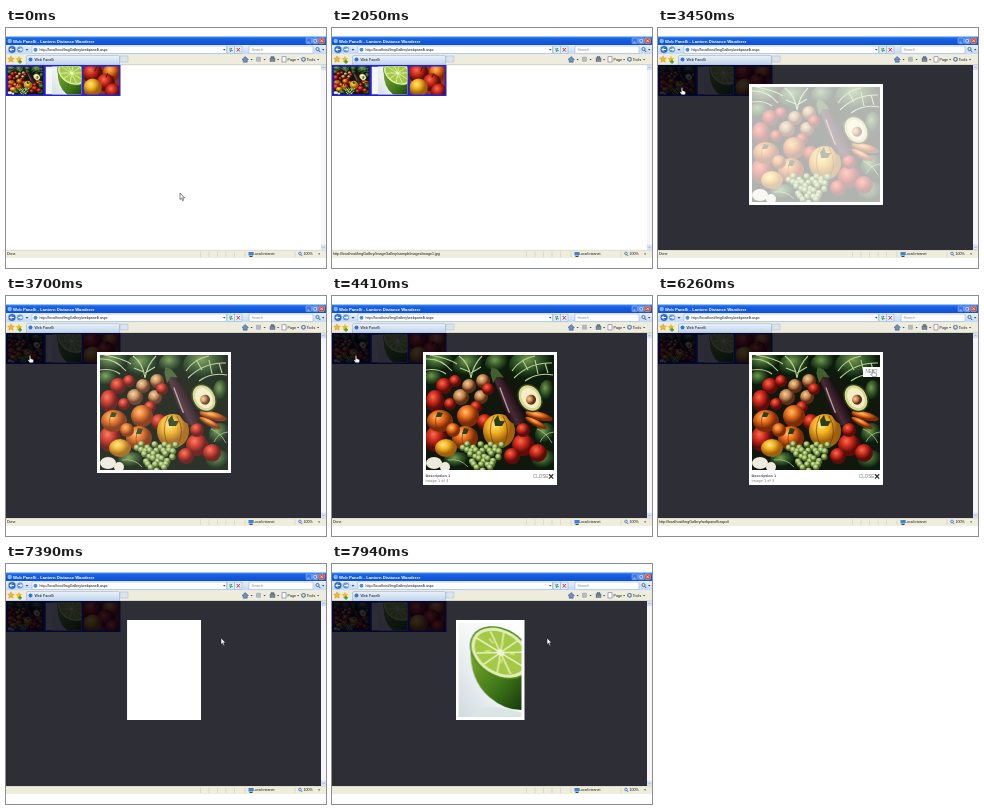
Animation, 320 px wide and 240 px high, one loop 8000 ms. Source, as an HTML page:

```html
<!DOCTYPE html>
<html lang="en">
<head>
<meta charset="utf-8">
<title>Web Panelli</title>
<style>
html, body { margin: 0; width: 100%; height: 100%; overflow: hidden; background: #fff; }
#stage { position: relative; width: 320px; height: 240px; overflow: hidden; background: #fff; }
#stage > *, #box > *, #pointer > * { position: absolute; }
svg { display: block; }
text { font-family: "Liberation Sans", Arial, sans-serif; font-size: 3.6px; fill: #111; }
#chrome, #defs { left: 0; top: 0; }

#veil { left: 0; top: 37px; width: 315px; height: 185px; background: rgba(0, 0, 12, .82); }
#box { left: 158px; top: 56px; transform: translateX(-50%); background: #fff; overflow: hidden; }
#photo1, #photo2 { left: 3px; top: 3px; }
#caption { left: 91px; top: 177px; width: 134px; overflow: hidden; background: #fff; }
#next { left: 205px; top: 71px; }
#arrow, #hand { left: 0; top: 0; }

#veil, #box, #photo1, #photo2, #caption, #arrow, #hand, #pointer, #next, .status {
  animation: 8s linear infinite;
}
#veil { animation-name: veil; }
#box { animation-name: size, boxOn; animation-duration: 8s, 8s; animation-timing-function: ease-in-out, step-end; }
#photo1 { animation-name: photo1; }
#photo2 { animation-name: photo2; }
#caption { animation-name: caption; }
#pointer { left: 0; top: 0; animation-name: move; animation-timing-function: ease-in-out; }
#arrow { animation-name: arrow; animation-timing-function: step-end; }
#hand { animation-name: hand; animation-timing-function: step-end; }
#next { animation-name: next; animation-timing-function: step-end; }
.status { animation-timing-function: step-end; }
#done { animation-name: done; }
#link1 { animation-name: link1; }
#link2 { animation-name: link2; }

@keyframes veil { 0%, 33.6% { opacity: 0; } 36.625%, 100% { opacity: 1; } }
@keyframes boxOn { 0% { opacity: 0; } 36.625%, 100% { opacity: 1; } }
@keyframes size {
  0%, 36.625% { width: 78px; height: 78px; }
  38.75% { width: 78px; height: 121px; }
  41.25%, 83.5% { width: 134px; height: 121px; }
  87.625% { width: 134px; height: 100px; animation-timing-function: step-end; }
  88.375% { width: 121px; height: 100px; animation-timing-function: step-end; }
  90.875% { width: 104px; height: 100px; animation-timing-function: linear; }
  91.625% { width: 86px; height: 100px; animation-timing-function: linear; }
  92.375% { width: 74px; height: 100px; animation-timing-function: ease-out; }
  93.25%, 100% { width: 69px; height: 100px; }
}
@keyframes photo1 {
  0%, 41% { opacity: 0; }
  43.125% { opacity: .32; }
  46.25% { opacity: .88; }
  48.75%, 79.87% { opacity: 1; }
  79.875%, 100% { opacity: 0; }
}
@keyframes photo2 { 0%, 93.25% { opacity: 0; } 99.25%, 100% { opacity: 1; } }
@keyframes caption {
  0%, 50.5% { height: 0; }
  54.5%, 79.87% { height: 12px; }
  79.875%, 100% { height: 0; }
}
@keyframes move {
  0%, 5.4% { transform: translate(174px, 165px); }
  14%, 59.5% { transform: translate(24px, 60px); }
  68.5%, 100% { transform: translate(215px, 74px); }
}
@keyframes arrow {
  0% { opacity: 1; } 13.25% { opacity: 0; } 57.5% { opacity: 1; }
  70.125% { opacity: 0; } 79.875%, 100% { opacity: 1; }
}
@keyframes hand {
  0% { opacity: 0; } 13.25% { opacity: 1; } 25.625% { opacity: 0; } 27.25% { opacity: 1; }
  57.5% { opacity: 0; } 70.125% { opacity: 1; } 79.875%, 100% { opacity: 0; }
}
@keyframes next { 0% { opacity: 0; } 68.5% { opacity: 1; } 79.875%, 100% { opacity: 0; } }
@keyframes done { 0% { opacity: 1; } 13.25% { opacity: 0; } 27.25% { opacity: 1; } 78.25%, 100% { opacity: 0; } }
@keyframes link1 { 0% { opacity: 0; } 13.25% { opacity: 1; } 27.25%, 100% { opacity: 0; } }
@keyframes link2 { 0% { opacity: 0; } 78.25% { opacity: 1; } 79.875%, 100% { opacity: 0; } }
</style>
</head>
<body>
<div id="stage">

<svg id="defs" width="0" height="0">
  <defs>
    <radialGradient id="red" cx=".38" cy=".32"><stop offset="0" stop-color="#f4704c"/><stop offset=".5" stop-color="#cf2a1c"/><stop offset="1" stop-color="#5c0d0a"/></radialGradient>
    <radialGradient id="orange" cx=".38" cy=".32"><stop offset="0" stop-color="#ffc468"/><stop offset=".5" stop-color="#ea6d1c"/><stop offset="1" stop-color="#7c2c08"/></radialGradient>
    <radialGradient id="yellow" cx=".38" cy=".32"><stop offset="0" stop-color="#ffe884"/><stop offset=".5" stop-color="#f0b020"/><stop offset="1" stop-color="#a0600c"/></radialGradient>
    <radialGradient id="tan" cx=".38" cy=".32"><stop offset="0" stop-color="#f4d0a0"/><stop offset=".6" stop-color="#c08048"/><stop offset="1" stop-color="#5c3018"/></radialGradient>
    <radialGradient id="green" cx=".38" cy=".32"><stop offset="0" stop-color="#759a4c"/><stop offset=".5" stop-color="#34592a"/><stop offset="1" stop-color="#0c1c0c"/></radialGradient>
    <radialGradient id="grape" cx=".38" cy=".32"><stop offset="0" stop-color="#dcebb0"/><stop offset=".6" stop-color="#98b45c"/><stop offset="1" stop-color="#486628"/></radialGradient>
    <linearGradient id="plum"><stop offset="0" stop-color="#120a10"/><stop offset=".35" stop-color="#4a2a34"/><stop offset="1" stop-color="#0c060a"/></linearGradient>
    <linearGradient id="backdrop" x1="1" x2="0" y2="1"><stop offset="0" stop-color="#fff"/><stop offset=".5" stop-color="#f4f7f8"/><stop offset="1" stop-color="#cfdae0"/></linearGradient>
    <linearGradient id="rind" y2="1"><stop offset="0" stop-color="#7fae2c"/><stop offset=".6" stop-color="#3d7418"/><stop offset="1" stop-color="#17380c"/></linearGradient>
    <linearGradient id="title" x2="0" y2="1"><stop offset="0" stop-color="#3f8cf5"/><stop offset=".3" stop-color="#1560e4"/><stop offset="1" stop-color="#1150ce"/></linearGradient>
    <linearGradient id="bar" x2="0" y2="1"><stop offset="0" stop-color="#e8f1fd"/><stop offset="1" stop-color="#c4d8f2"/></linearGradient>
    <linearGradient id="tab" x2="0" y2="1"><stop offset="0" stop-color="#eaf2fb"/><stop offset="1" stop-color="#bfd3ea"/></linearGradient>

    <symbol id="veg" viewBox="0 0 128 115" preserveAspectRatio="none">
      <rect width="128" height="115" fill="#11170c"/>
      <g fill="url(#green)">
        <ellipse cx="14" cy="8" rx="18" ry="12"/><ellipse cx="44" cy="11" rx="17" ry="14"/>
        <ellipse cx="8" cy="24" rx="11" ry="9"/><ellipse cx="72" cy="9" rx="13" ry="11"/>
        <ellipse cx="107" cy="11" rx="24" ry="18"/><ellipse cx="121" cy="37" rx="8" ry="12"/>
        <ellipse cx="120" cy="80" rx="11" ry="12"/><ellipse cx="92" cy="67" rx="8" ry="6"/>
        <ellipse cx="119" cy="106" rx="13" ry="11"/><ellipse cx="32" cy="106" rx="14" ry="9"/>
      </g>
      <g fill="none" stroke="#b9cf94" stroke-width="1.1">
        <path d="M0 4Q15 3 26 16M4 0Q22 3 31 9M0 15Q12 13 20 19M33 1Q43 8 45 23M56 1Q47 10 45 23M34 13L44 17M55 12L45 18"/>
        <path d="M86 16Q95 3 109 1M88 23Q104 7 126 8M99 26Q111 17 127 20M97 6L102 15M109 5L112 19M119 8L122 18"/>
        <path d="M111 74Q120 77 126 88M114 87Q118 78 128 77M22 105Q34 103 42 112" stroke-width=".7"/>
      </g>
      <g fill="url(#tan)"><circle cx="35" cy="42" r="8"/><circle cx="43" cy="31" r="7"/><circle cx="57" cy="26" r="7"/><circle cx="55" cy="42" r="7"/></g>
      <g fill="url(#red)">
        <circle cx="18" cy="31" r="8"/><circle cx="29" cy="26" r="6"/><circle cx="62" cy="34" r="6"/>
        <ellipse cx="9" cy="46" rx="9" ry="11"/><circle cx="24" cy="49" r="6"/><circle cx="50" cy="52" r="6"/>
        <ellipse cx="10" cy="84" rx="11" ry="13"/><circle cx="59" cy="67" r="8"/>
        <circle cx="97" cy="90" r="11"/><circle cx="112" cy="98" r="9"/><circle cx="86" cy="101" r="8"/><circle cx="97" cy="75" r="7"/>
      </g>
      <g fill="url(#orange)">
        <ellipse cx="14" cy="66" rx="13" ry="11"/><circle cx="42" cy="61" r="11"/>
        <ellipse cx="39" cy="83" rx="13" ry="12"/><circle cx="27" cy="75" r="7"/>
        <ellipse cx="113" cy="61" rx="14" ry="4" transform="rotate(14 113 61)"/><ellipse cx="110" cy="68" rx="12" ry="3" transform="rotate(28 110 68)"/>
      </g>
      <g fill="url(#yellow)"><ellipse cx="73" cy="76" rx="16" ry="17"/><ellipse cx="20" cy="93" rx="11" ry="9"/></g>
      <path d="M68 61Q60 76 69 91M77 61Q86 76 77 91M39 73Q33 84 39 94M12 57Q7 66 12 76" fill="none" stroke="#6e300a" stroke-width=".9" opacity=".7"/>
      <path d="M68 65L72 60L74 66L79 66L76 71L69 71ZM38 73l5 1-2 5h-5zM12 57l5 1-2 4h-5z" fill="#263f17"/>
      <g fill="#eeeade"><ellipse cx="8" cy="108" rx="8" ry="6"/><circle cx="19" cy="112" r="5"/></g>
      <g transform="rotate(-27 82 44)">
        <path d="M78 17Q82 13 86 17Q87 34 92 52Q94 70 82 72Q71 70 73 52Q78 34 78 17Z" fill="url(#plum)"/>
        <path d="M76 23L78 13L82 8L86 13L88 23L82 19Z" fill="#42602c"/>
        <path d="M80 30Q78 46 77 57" fill="none" stroke="#b9a0a4" stroke-width="1.3"/>
      </g>
      <g transform="rotate(-32 104 43)">
        <ellipse cx="104" cy="43" rx="12" ry="15" fill="#263b18"/>
        <ellipse cx="104" cy="43" rx="10.5" ry="13.500" fill="#d7d68a"/>
        <ellipse cx="104" cy="43" rx="8" ry="11" fill="#f4eec6"/>
        <circle cx="104" cy="45" r="5" fill="url(#tan)"/>
      </g>
      <g fill="url(#grape)" id="grapes"></g>
    </symbol>

    <symbol id="cut" viewBox="0 0 63 95" preserveAspectRatio="none">
      <rect width="63" height="95" fill="url(#backdrop)"/>
      <path d="M22 86Q44 83 63 91V95H10Z" fill="#dbe5e4"/>
      <path d="M12 25Q11 58 31 75Q46 88 63 88V25Z" fill="url(#rind)"/>
      <g transform="rotate(32 42 30)">
        <ellipse cx="42" cy="30" rx="33" ry="24" fill="#4f8a1e"/>
        <ellipse cx="42" cy="30" rx="31.5" ry="22.5" fill="#e2edb4"/>
        <ellipse cx="42" cy="30" rx="28" ry="19.5" fill="#a4c944"/>
        <path d="M14 30H70M22 17L62 43M34 11L50 49M50 11L34 49M62 17L22 43" stroke="#e8f2c0" stroke-width="1.5"/>
        <ellipse cx="42" cy="30" rx="4" ry="2.8" fill="#f1f5d6"/>
        <path d="M25 24l6 2M28 37l5-3M38 19l2 5M48 39l-2-4M55 24l-5 2" stroke="#cfe481" stroke-width="2"/>
      </g>
    </symbol>

    <symbol id="apples" viewBox="0 0 35 28" preserveAspectRatio="none">
      <rect width="35" height="28" fill="#8b3428"/>
      <circle cx="9" cy="7" r="10" fill="url(#red)"/><circle cx="28" cy="6" r="9" fill="url(#orange)"/>
      <circle cx="22" cy="16" r="9" fill="url(#red)"/><circle cx="9" cy="21" r="9" fill="url(#yellow)"/>
      <circle cx="29" cy="25" r="8" fill="url(#red)"/><path d="M11 5l2-5M22 11l2-4" stroke="#39240f"/>
    </symbol>
  </defs>
</svg>

<svg id="chrome" width="320" height="240">
  <rect y="8.5" width="320" height="8.5" fill="url(#title)"/>
  <circle cx="3.7" cy="13" r="2.2" fill="#7db8f4"/>
  <text x="7" y="14.6" style="font-size:4.2px;font-weight:bold;fill:#fff">Web Panelli - Lantern Distance Wanderer</text>
  <g stroke="#dce9ff" stroke-width=".4">
    <rect x="300" y="10" width="5.6" height="5.6" rx="1" fill="#3775ea"/>
    <rect x="306.4" y="10" width="5.6" height="5.6" rx="1" fill="#3775ea"/>
    <rect x="312.8" y="10" width="5.6" height="5.6" rx="1" fill="#dc4a25"/>
  </g>
  <path d="M301.5 14.1h2M307.8 11.6h2.8v2.6h-2.8zM314.3 11.5l2.6 2.6M316.9 11.5l-2.6 2.6" fill="none" stroke="#fff" stroke-width=".7"/>

  <rect y="17" width="320" height="9.5" fill="url(#bar)"/>
  <circle cx="6" cy="21.5" r="4" fill="#2867c4" stroke="#eaf3ff" stroke-width=".6"/>
  <circle cx="14" cy="21.5" r="3.5" fill="#5f96da" stroke="#eaf3ff" stroke-width=".6"/>
  <path d="M8 21.5H4M5.8 19.6L4 21.5L5.8 23.4M12.2 21.5H16M14.4 19.8L16 21.5L14.4 23.2" fill="none" stroke="#fff"/>
  <path d="M19.5 21h3l-1.5 1.8z" fill="#2a4f86"/>
  <rect x="26" y="18" width="194.5" height="7.5" fill="#fff" stroke="#8ca9d0" stroke-width=".5"/>
  <circle cx="29.5" cy="21.7" r="2" fill="#4a91dc"/>
  <text x="33.5" y="23">http://localhost/ImgGallery/webpanelli.aspx</text>
  <path d="M217 21h2.6l-1.3 1.6z" fill="#345"/>
  <g fill="#e2edfb" stroke="#8ca9d0" stroke-width=".5"><rect x="221" y="18" width="7.500" height="7.5"/><rect x="228.500" y="18" width="7.500" height="7.5"/></g>
  <path d="M223 21h3l-1-1.2M226.800 22.7h-3l1 1.2" fill="none" stroke="#30923c" stroke-width=".9"/>
  <path d="M230.700 20l3.2 3.6M233.900 20l-3.2 3.6" stroke="#d13a2c"/>
  <rect x="243" y="18" width="64" height="7.5" fill="#fff" stroke="#8ca9d0" stroke-width=".5"/>
  <text x="245.500" y="23" style="fill:#888">Search</text>
  <circle cx="311.5" cy="21" r="1.6" fill="none" stroke="#29588f" stroke-width=".8"/><path d="M312.6 22.2l1.7 1.9" stroke="#29588f"/>
  <path d="M316 21h2.4l-1.2 1.5z" fill="#345"/>

  <rect y="26.5" width="320" height="10.5" fill="#eeecdc"/>
  <path d="M0 36.700H320" stroke="#b9bdb8" stroke-width=".6"/>
  <path d="M5 27.800l1 2.200 2.400.2-1.800 1.600.6 2.400L5 33l-2.200 1.200.6-2.400-1.800-1.600L4 30z" fill="#f4b71e" stroke="#b87c0b" stroke-width=".3"/>
  <path d="M13 27.800l1 2.200 2.400.2-1.800 1.600.6 2.400-2.200-1.200-2.200 1.200.6-2.400-1.800-1.600L12 30z" fill="#f4b71e"/>
  <path d="M14 31.800v4M12 33.800h4" stroke="#2b9a37" stroke-width="1.200"/>
  <path d="M20.500 37V29q0-1.500 1.500-1.500H112q1.500 0 1.500 1.500V37z" fill="url(#tab)" stroke="#8ca9c4" stroke-width=".5"/>
  <rect x="114" y="28" width="8" height="6" fill="#d9e4ee" stroke="#a3b8cc" stroke-width=".5"/>
  <circle cx="24.500" cy="31.500" r="2" fill="#2f78cc"/>
  <text x="28.500" y="33">Web Panelli</text>
  <path d="M236 31.500L239.200 28.500L242.400 31.500H241.200V34.200H237.200V31.500Z" fill="#6d8fbd" stroke="#48648c" stroke-width=".6"/>
  <rect x="250" y="28.800" width="5" height="5" rx=".8" fill="#b4b9ba"/>
  <path d="M264 30h5v3.500h-5zM265 28.500h3V30h-3z" fill="#78889e" stroke="#45566d" stroke-width=".4"/>
  <rect x="276" y="28.800" width="4" height="5.200" fill="#fff" stroke="#557" stroke-width=".5"/>
  <text x="281.500" y="33">Page</text>
  <circle cx="297.500" cy="31.300" r="1.800" fill="none" stroke="#54779f" stroke-width="1.200"/>
  <text x="300.800" y="33">Tools</text>
  <path d="M244.500 31h2.200l-1.100 1.300zM257.500 31h2.200l-1.100 1.300zM271 31h2.200l-1.100 1.300zM291 31h2.200l-1.100 1.300zM311 31h2.200l-1.100 1.300z" fill="#345"/>

  <rect y="37" width="114.500" height="31" fill="#2422dc"/>
  <use href="#veg" x="1.500" y="38.500" width="36" height="28"/>
  <svg x="39.500" y="38.500" width="36" height="28" viewBox="-14 16 77 60" preserveAspectRatio="none">
    <rect x="-14" y="16" width="77" height="60" fill="#f4f7f4"/>
    <use href="#cut" width="63" height="95"/>
  </svg>
  <use href="#apples" x="77.500" y="38.500" width="35.500" height="28"/>

  <rect x="315" y="37" width="5" height="185" fill="#f5f5fa"/>
  <g fill="#dde6f8" stroke="#c3d0ea" stroke-width=".4"><rect x="315.300" y="37.300" width="4.400" height="4.600"/><rect x="315.300" y="217" width="4.400" height="4.600"/></g>
  <path d="M316.300 40.300l1.200-1.400 1.200 1.400M316.300 218.700l1.200 1.400 1.200-1.400" fill="none" stroke="#7f9bd0" stroke-width=".7"/>

  <rect y="222" width="320" height="8" fill="#efedde"/>
  <path d="M0 222.300H320" stroke="#d2cfbe" stroke-width=".6"/>
  <path d="M194.500 223.500V229M203 223.500V229M211.500 223.500V229M220 223.500V229M228.500 223.500V229M239 223.500V229M289 223.500V229" stroke="#d0ccba" stroke-width=".6"/>
  <text class="status" id="done" x="1" y="227.300">Done</text>
  <text class="status" id="link1" x="1" y="227.300">http://localhost/ImgGallery/ImageGallery/sampleImages/image1.jpg</text>
  <text class="status" id="link2" x="1" y="227.300">http://localhost/ImgGallery/webpanelli.aspx#</text>
  <rect x="242.500" y="224" width="4.500" height="3.500" fill="#3f83d2"/><path d="M243.500 228.500h3" stroke="#345"/>
  <text x="247" y="227.400">Local intranet</text>
  <circle cx="294" cy="225.500" r="1.400" fill="#b8dcff" stroke="#38629a" stroke-width=".6"/><path d="M295 226.600l1.300 1.500" stroke="#38629a" stroke-width=".8"/>
  <text x="297.500" y="227.400">100%</text>
  <path d="M312 225.400h2.200l-1.100 1.300z" fill="#333"/>
</svg>

<div id="veil"></div>
<div id="box">
  <svg id="photo1" width="128" height="115"><use href="#veg" width="128" height="115"/></svg>
  <svg id="photo2" width="63" height="94"><use href="#cut" width="63" height="94"/></svg>
</div>
<div id="caption">
  <svg width="134" height="12">
    <g style="font-family:'DejaVu Sans',sans-serif">
      <text x="2.500" y="4.400" style="font-family:inherit;font-size:3.300px;font-weight:bold;fill:#555">Description 1</text>
      <text x="2.500" y="8.800" style="font-family:inherit;font-size:3.600px;fill:#777">Image 1 of 3</text>
    </g>
    <text x="110" y="5" style="font-size:4.500px;fill:#777">CLOSE</text>
    <path d="M126 1.300l4.200 4.300M130.200 1.300l-4.200 4.300" stroke="#333" stroke-width="1.300"/>
  </svg>
</div>
<svg id="next" width="17" height="10">
  <rect width="17" height="10" fill="#fff"/>
  <text x="2.500" y="6.400" style="font-size:4.500px;fill:#777">NEXT</text>
</svg>
<div id="pointer">
  <svg id="arrow" width="8" height="10" overflow="visible">
    <path d="M0 0V6.500L1.500 5.200L2.600 7.700L3.700 7.200L2.600 4.800H4.600Z" fill="#fff" stroke="#111" stroke-width=".5"/>
  </svg>
  <svg id="hand" width="8" height="10" overflow="visible">
    <path d="M-.7 0Q0-.8.700 0V2.700L3.200 3.400Q3.800 4 3.600 5L3 6.700H-.3L-2.200 4.300Q-1.600 3.400-.7 4.200Z" fill="#fff" stroke="#111" stroke-width=".4"/>
  </svg>
</div>
</div>

<script>
// A bunch of grapes: rows that narrow towards the bottom
let bunch = "";
for (let row = 0; row < 6; row++) {
  for (let i = 0; i < 8 - row; i++) {
    const x = 37 + i * 5.6 + row * 3 + Math.sin(i * 5 + row) * 1.4;
    const y = 91 + row * 4.6 + Math.cos(i * 3 + row * 2) * 1.8;
    bunch += `<circle cx="${x.toFixed(1)}" cy="${y.toFixed(1)}" r="3.2"/>`;
  }
}
document.getElementById("grapes").innerHTML = bunch;
</script>
</body>
</html>
```
